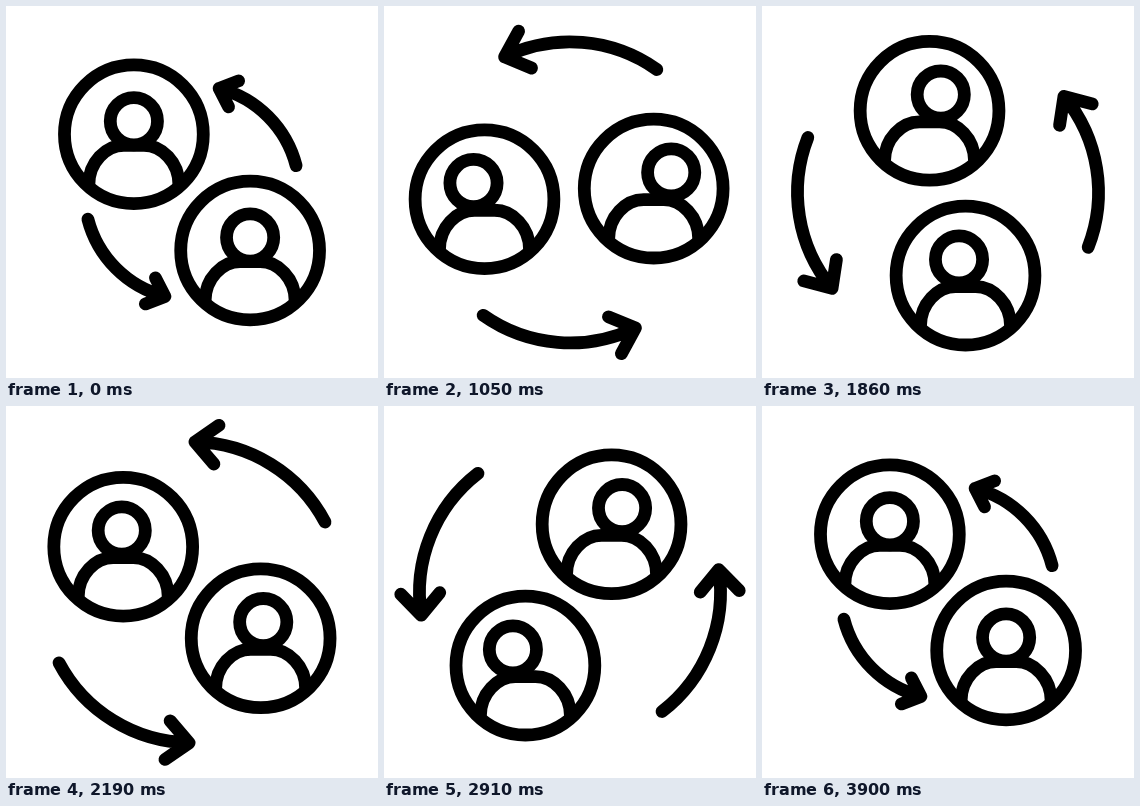
Recreate the animation shown at these times as an HTML page with a canvas. Size 372 px wide and 372 px high, loop 4500 ms.

```html
<!DOCTYPE html>
<html lang="en">
<head>
<meta charset="utf-8">
<title>Two people swapping places</title>
<style>
  html, body { margin: 0; width: 100%; height: 100%; overflow: hidden; background: #fff; }
  canvas { display: block; }
</style>
</head>
<body>
<canvas id="stage" width="372" height="372"></canvas>
<script>
const ctx = document.getElementById('stage').getContext('2d');
const LOOP = 4500, STEP = 30, START = 300, END = 3900;
const CENTER = [186, 186.4], TURN = 2 * Math.PI, DEG = Math.PI / 180;
const ARROW_RADIUS = 107.5, TIP = -75.4 * DEG, TAIL = -14.4 * DEG;
const ARMS = [[19.5, -7.5], [9.5, 18.5]];
const shoulders = new Path2D('M-45 50C-45 28 -28 11 -10 11H10C28 11 45 28 45 50');

const clamp = x => Math.min(1, Math.max(0, x));
const smooth = x => x * x * (3 - 2 * x);
const ramp = (t, from, to) => smooth(clamp((t - from) / (to - from)));

// Cubic bezier easing (.254, 0, .75, 1), solved by bisection
function orbitEase(x) {
  let low = 0, high = 1;
  for (let i = 0; i < 24; i++) {
    const s = (low + high) / 2, r = 1 - s;
    if (3 * s * r * r * 0.254 + 3 * s * s * r * 0.75 + s ** 3 < x) low = s;
    else high = s;
  }
  return smooth(low);
}

function ring(x, y, radius) {
  ctx.beginPath();
  ctx.arc(x, y, radius, 0, TURN);
  ctx.stroke();
}

// The orbit bulges slightly towards the lower left
function person(turn, start, headX, headY) {
  const angle = start + turn;
  const distance = 82.2 + 2.6 * Math.sin(2 * turn) ** 2;
  const bulge = Math.sin(turn) ** 2;
  ctx.save();
  ctx.translate(distance * Math.cos(angle) - 1.6 * bulge, 2.7 * bulge - distance * Math.sin(angle));
  ring(0, 0, 69.4);
  ring(headX, headY, 23.6);
  ctx.stroke(shoulders);
  ctx.restore();
}

function arrow(rotation, size) {
  const radius = ARROW_RADIUS * size;
  const x = radius * Math.cos(TIP), y = radius * Math.sin(TIP);
  const [a, b] = ARMS.map(([dx, dy]) => [x + dx * size, y + dy * size]);
  ctx.save();
  ctx.rotate(-rotation);
  ctx.beginPath();
  ctx.arc(0, 0, radius, TIP, TAIL);
  ctx.moveTo(...a);
  ctx.lineTo(x, y);
  ctx.lineTo(...b);
  ctx.stroke();
  ctx.restore();
}

function draw(t) {
  const progress = clamp((t - START) / (END - START));
  const turn = TURN * orbitEase(progress);
  const spin = TURN * smooth(progress);
  const size = 1 + 0.4 * (ramp(t, START, 1060) - ramp(t, 3000, 3800));

  const offset = ramp(t, START, 1000) - ramp(t, 3030, END);
  const swing = ramp(t, 1530, 2650);
  const lean = (first, second) => (first + (second - first) * swing) * offset;
  const headY = -13 - 3.2 * offset;

  ctx.setTransform(1, 0, 0, 1, 0, 0);
  ctx.fillStyle = '#fff';
  ctx.fillRect(0, 0, 372, 372);
  ctx.translate(...CENTER);
  ctx.strokeStyle = '#000';
  ctx.lineWidth = 12.8;
  ctx.lineCap = ctx.lineJoin = 'round';

  person(turn, 135 * DEG, lean(-11, 10.5), headY);
  person(turn, -45 * DEG, lean(17.5, -12.5), headY);
  arrow(spin, size);
  arrow(spin + Math.PI, size);
}

function tick() {
  const t = performance.now() % LOOP;
  draw(Math.floor(t / STEP) * STEP);
  requestAnimationFrame(tick);
}
tick();
</script>
</body>
</html>
```
